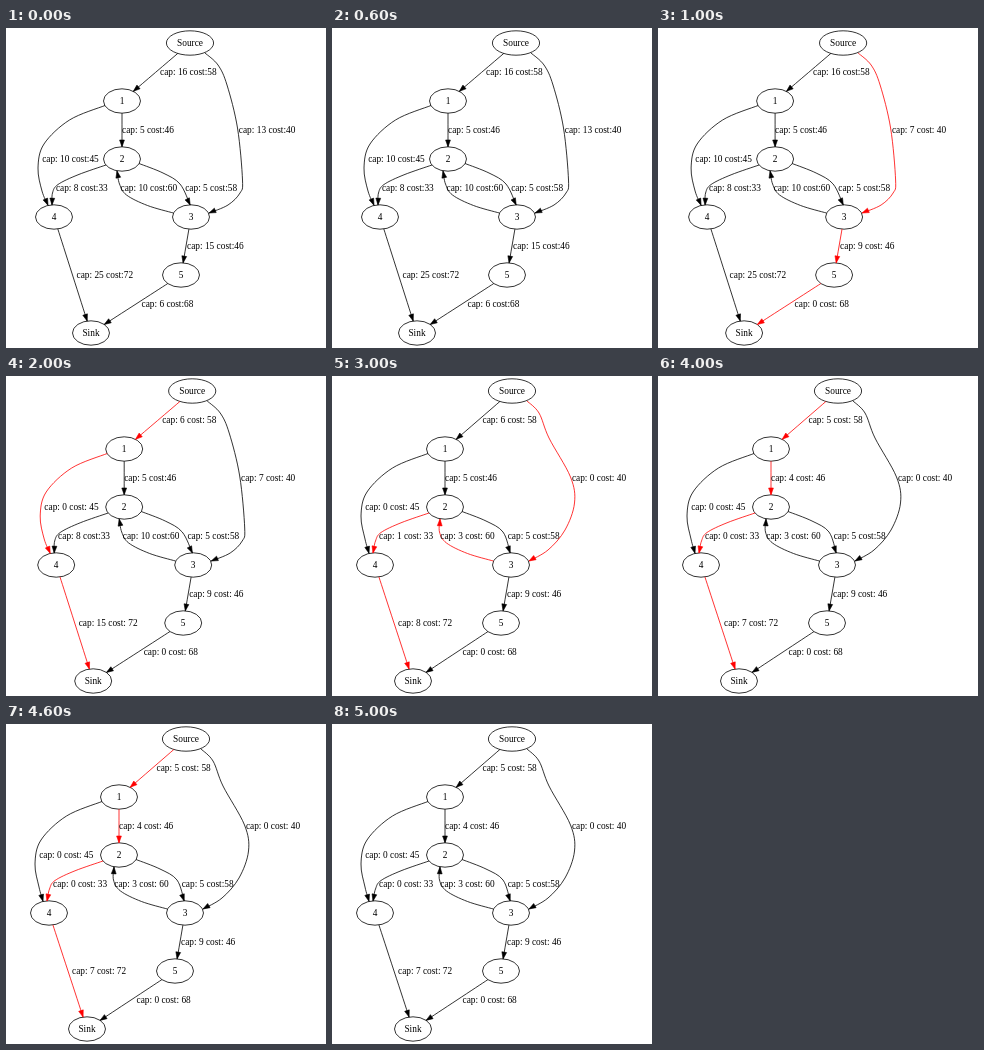
Write an HTML page that moves like this. It is 320 px wide and 320 px high and loops after 6 s.

```html
<!DOCTYPE html>
<html lang="en">
<head>
<meta charset="utf-8">
<title>Minimum cost flow</title>
<style>
html, body { margin: 0; width: 100%; height: 100%; overflow: hidden; background: #fff; }
svg { display: block; width: 100%; height: 100%; }
text { font: 9.35px "Liberation Serif", "Times New Roman", serif; }
ellipse, .line { fill: none; stroke-width: .8; }
ellipse { stroke: #000; }
</style>
</head>
<body>
<svg id="stage" viewBox="0 0 320 320"></svg>
<script>
const STEP = 1000, RANK = 58, RY = 12.2, HEAD = 6.8, HALF = 2.4, LATE = 3;
const stage = document.getElementById('stage');

// x in the early and in the late layout
const nodes = {
  S: { name: 'Source', rank: 0, x: [184, 180], rx: 23.6 },
  1: { rank: 1, x: [116, 113] },
  2: { rank: 2, x: [116, 113] },
  3: { rank: 3, x: [185, 179] },
  4: { rank: 3, x: [48, 43] },
  5: { rank: 4, x: [175, 169] },
  T: { name: 'Sink', rank: 5, x: [85, 81] }
};

// gap: space between line and label. via: points from the start node's centre,
// tip: arrow point from the end node's centre. Edges without via are straight.
const edges = {
  S1: { cap: 16, cost: 58, gap: 4 },
  S3: {
    cap: 13, cost: 40, gap: 1, tip: [18, -4],
    via: [[15, 10], [28, 22], [37, 42], [47.5, 85], [52.5, 137], [50, 150], [38, 162]],
    lateVia: [[15, 10], [27, 22], [37, 47], [58.5, 86], [62.5, 112], [53, 139], [36, 159]]
  },
  12: { cap: 5, cost: 46, gap: 0 },
  14: {
    cap: 10, cost: 45, gap: 3.5, tip: [-6, -11.7],
    via: [[-17, 4.5], [-52.5, 19], [-78, 43], [-84, 67], [-80, 90]]
  },
  24: { cap: 8, cost: 33, gap: 1.5, tip: [-2, -12], via: [[-16, 6], [-44, 15.8], [-64, 25.5], [-69.5, 34]] },
  32: { cap: 10, cost: 60, gap: -.5, tip: [-5, 12], via: [[-17.7, -4], [-43.5, -11.5], [-64.5, -22], [-71.5, -33]] },
  23: { cap: 5, cost: 58, gap: 2.5, tip: [-.8, -12], via: [[17, 4.5], [41, 14], [58, 25]] },
  35: { cap: 15, cost: 46, gap: 1 },
  '4T': { cap: 25, cost: 72, gap: 4 },
  '5T': { cap: 6, cost: 68, gap: 5.5 }
};

// Capacities changed by the augmenting path of each step
const steps = [
  {},
  { S3: 7, 35: 9, '5T': 0 },
  { S1: 6, 14: 0, '4T': 15 },
  { S3: 0, 32: 3, 24: 1, '4T': 8 },
  { S1: 5, 12: 4, 24: 0, '4T': 7 },
  {}
];

function set(el, attrs) {
  for (const k in attrs) el.setAttribute(k, attrs[k]);
}
function add(tag, attrs) {
  const el = document.createElementNS('http://www.w3.org/2000/svg', tag);
  set(el, attrs);
  return stage.appendChild(el);
}

for (const id in nodes) {
  const n = nodes[id];
  n.rx = n.rx || 18.5;
  n.cy = 15 + RANK * n.rank;
  n.shape = add('ellipse', { cy: n.cy, rx: n.rx, ry: RY });
  n.label = add('text', { y: n.cy + 3, 'text-anchor': 'middle' });
  n.label.textContent = n.name || id;
}
for (const id in edges) {
  const e = edges[id];
  e.from = nodes[id[0]];
  e.to = nodes[id[1]];
  e.midY = (e.from.cy + e.to.cy) / 2;
  e.line = add('path', { class: 'line' });
  e.head = add('path', { 'stroke-width': .6 });
  e.label = add('text', { y: e.midY + 3 });
}

// Point on a node's rim in the direction of another node
function rim(n, other) {
  const dx = other.cx - n.cx, dy = other.cy - n.cy;
  const t = 1 / Math.hypot(dx / n.rx, dy / RY);
  return [n.cx + dx * t, n.cy + dy * t];
}

function edgePoints(e, late) {
  const { from, to, tip } = e;
  if (!tip) return [rim(from, to), rim(to, from)];
  const via = late && e.lateVia || e.via;
  return [...via.map(([x, y]) => [from.cx + x, from.cy + y]), [to.cx + tip[0], to.cy + tip[1]]];
}

// Smooth curve through all points
function spline(pts) {
  const at = i => pts[Math.max(0, Math.min(pts.length - 1, i))];
  const control = (p, a, b) => p.map((v, k) => v + (b[k] - a[k]) / 6);
  let d = `M${pts[0]}`;
  for (let i = 0; i < pts.length - 1; i++) {
    const c1 = control(at(i), at(i - 1), at(i + 1));
    const c2 = control(at(i + 1), at(i + 2), at(i));
    d += `C${c1} ${c2} ${at(i + 1)}`;
  }
  return d;
}

function arrow([[ax, ay], [x, y]]) {
  const len = Math.hypot(x - ax, y - ay);
  const ux = (x - ax) / len, uy = (y - ay) / len;
  const bx = x - ux * HEAD, by = y - uy * HEAD;
  return `M${bx - uy * HALF},${by + ux * HALF}L${x},${y}L${bx + uy * HALF},${by - ux * HALF}Z`;
}

// x where a line crosses the given height
function crossing(line, y) {
  let lo = 0, hi = line.getTotalLength();
  const down = line.getPointAtLength(hi).y > line.getPointAtLength(0).y;
  for (let i = 0; i < 14; i++) {
    const mid = (lo + hi) / 2;
    if (line.getPointAtLength(mid).y < y === down) lo = mid; else hi = mid;
  }
  return line.getPointAtLength(lo).x;
}

function show(step) {
  const late = step >= LATE;
  const caps = Object.assign({}, ...steps.slice(0, step + 1));
  for (const n of Object.values(nodes)) {
    n.cx = late ? n.x[1] : n.x[0] + 1.1 * step;
    set(n.shape, { cx: n.cx });
    set(n.label, { x: n.cx });
  }
  for (const id in edges) {
    const e = edges[id], pts = edgePoints(e, late);
    const color = id in steps[step] ? '#f00' : '#000';
    set(e.line, { d: spline(pts), stroke: color });
    set(e.head, { d: arrow(pts.slice(-2)), fill: color, stroke: color });
    set(e.label, { x: crossing(e.line, e.midY) + e.gap });
    e.label.textContent = id in caps
      ? `cap: ${caps[id]} cost: ${e.cost}`
      : `cap: ${e.cap} cost:${e.cost}`;
  }
}

let current = -1;
const origin = performance.now();
function tick() {
  const step = Math.floor((performance.now() - origin) / STEP) % steps.length;
  if (step !== current) show(current = step);
  requestAnimationFrame(tick);
}
tick();
</script>
</body>
</html>
```
